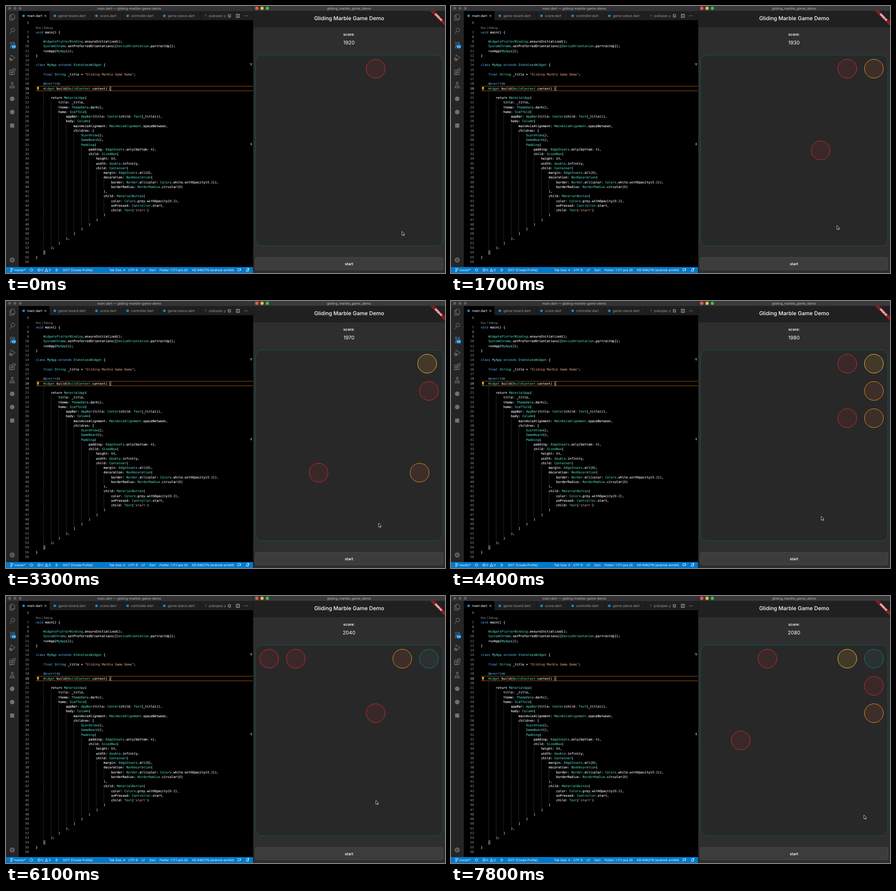
Write an HTML page that moves like this. It is 958x584 px and loops after 8 s.

```html
<!DOCTYPE html>
<html lang="en">
<head>
<meta charset="utf-8">
<title>Gliding Marble Game Demo</title>
<style>
  html, body { margin: 0; width: 100%; height: 100%; overflow: hidden; background: #000; }
  svg { display: block; width: 100vw; height: 100vh; }
  text { font-family: Inter, "Open Sans", sans-serif; fill: #fff; white-space: pre; text-rendering: geometricPrecision; }
  .mono text { font: 6.834px "DejaVu Sans Mono", monospace; color: #fff; }
  .mono text, .mono tspan { fill: currentColor; stroke: currentColor; stroke-width: .14; }
  .mid { text-anchor: middle; }
  .icon { fill: none; stroke: #858585; stroke-width: 1; }
  .kw { color: #569cd6; } .type { color: #4ec9b0; } .str { color: #ce9178; } .num { color: #b5cea8; }
</style>
</head>
<body>
<svg id="stage" viewBox="0 0 958 584" preserveAspectRatio="none">
  <rect width="958" height="584"/>
  <rect width="539" height="11" fill="#333335"/>
  <g fill="#5d5d5f"><circle cx="8" cy="5" r="3.2"/><circle cx="19.5" cy="5" r="3.2"/><circle cx="31" cy="5" r="3.2"/></g>
  <text class="mid" x="269" y="7.5" font-size="7.3" style="fill:#bbb">main.dart — gliding-marble-game-demo</text>
  <rect y="11" width="28" height="560" fill="#252526"/>
  <rect x="28" y="11" width="511" height="20" fill="#1f1f20"/>
  <rect x="28" y="11" width="67" height="20"/>
  <g id="tabs"></g>
  <path d="M83.8 19.3l4.4 4.4m0-4.4l-4.4 4.4" stroke="#ddd" stroke-width=".9"/>
  <g fill="none" stroke="#ccc" stroke-width=".9">
    <path d="M485 25v-6h3m-1.5-1.5l1.5 1.5-1.5 1.5M490 18v6h-3m1.5-1.5l-1.5 1.5 1.5 1.5"/>
    <path d="M502.5 18h7v7h-7zM506 18v7"/>
  </g>
  <g fill="#ccc"><circle cx="520.5" cy="21.5" r=".7"/><circle cx="523.5" cy="21.5" r=".7"/><circle cx="526.5" cy="21.5" r=".7"/></g>

  <g class="icon">
    <path d="M11 21V18h5l3 3v7h-8v-7M11 21H8v10h8v-3"/>
    <path d="M12 56l-4 5M15 48.5a4 4 0 1 1-.1 0"/>
    <path d="M11 82.5v6M17 83c0 3-6 2-6 5M11 78.5a2 2 0 1 1-.1 0M17 79a2 2 0 1 1-.1 0M11 88a2 2 0 1 1-.1 0"/>
    <path d="M11 111v-4l9 6-7 5M10.5 114a2.8 3 0 1 1-.1 0M7 117h7M8 113l5 7"/>
    <path d="M8 140h5v10H8zM8 145h10v5H8M15 137h5v5h-5z"/>
    <path d="M11 167h5M12 167v5l-4 7h11l-4-7v-5M10 176h7"/>
    <circle cx="13.5" cy="555.5" r="4.5" stroke-width="2" stroke-dasharray="2 1.53"/>
    <circle cx="13.5" cy="555.5" r="3.8"/><circle cx="13.5" cy="555.5" r="1.5"/>
  </g>
  <g fill="#707070">
    <circle cx="13.5" cy="203" r="5"/><circle cx="13.5" cy="232" r="5"/>
    <rect x="9" y="257" width="9" height="9"/>
  </g>
  <circle cx="17" cy="88.5" r="5.3" fill="#007acc"/>
  <text class="mid" x="17" y="90.6" font-size="5.6" font-weight="600">94</text>

  <g id="guides" stroke="#3c3c3c" stroke-width=".7"></g>
  <path d="M66 175.5H538.5M66 185.5H538.5" stroke="#a0560f"/>
  <g fill="none" stroke="#888" stroke-width=".7"><path d="M225.8 176.2h4v8.6h-4zM81.7 534.8h4v8.6h-4z"/></g>
  <circle cx="69.8" cy="179.3" r="2.3" fill="#fc0"/><path d="M68.8 182h2v2h-2z" fill="#ddd"/>
  <text x="65" y="50" font-size="6.3" style="fill:#999">Run | Debug</text>
  <g id="code" class="mono"></g>
  <path d="M531.5 126h6.5M535 126v5M533 128h4" stroke="#888"/>
  <path d="M535 299.5v5" stroke="#999" stroke-width="2"/>

  <rect y="571" width="539" height="13" fill="#007acc"/>
  <g id="status"></g>
  <g fill="none" stroke="#fff" stroke-width=".8">
    <path d="M11 575.5v4M14.5 576v1c0 1.5-3.5 1-3.5 2.5M11 573.5a1 1 0 1 1-.1 0M14.5 574a1 1 0 1 1-.1 0M11 579.5a1 1 0 1 1-.1 0"/>
    <path d="M52.5 577.5a3 3 0 0 1 5.7-1M58.8 577.5a3 3 0 0 1-5.7 1M57 576.7h2M52.2 578.3h2"/>
    <path d="M72.2 574.5a3 3 0 1 1-.1 0M71 576.4l2.4 2.4m0-2.4l-2.4 2.4"/>
    <path d="M88.3 574.5l3.3 6h-6.6zM88.3 576.5v2"/>
    <path d="M109.3 574.7l4.2 2.9-4.2 2.9z"/>
    <path d="M506 574.5h6v4h-3l-2 2v-2h-1zM509 579l4-4"/>
    <path d="M524 579.5h6l-1-1.5v-2a2 2 0 0 0-4 0v2zM526.3 580.5h1.5"/>
  </g>
  <circle cx="529" cy="575" r="1.5" fill="#fff"/>

  <rect x="539" width="419" height="584" fill="#2e2e2e"/>
  <rect x="539" width="419" height="11" fill="#3a3a3c"/>
  <circle cx="547.3" cy="5" r="3.4" fill="#fc5753"/><circle cx="558.8" cy="5" r="3.4" fill="#fdbc40"/><circle cx="570.3" cy="5" r="3.4" fill="#33c748"/>
  <text class="mid" x="748.5" y="7.6" font-size="7.3" style="fill:#bbb">gliding_marble_game_demo</text>
  <linearGradient id="shade" x2="0" y2="1"><stop stop-opacity=".45"/><stop offset="1" stop-opacity="0"/></linearGradient>
  <rect x="540" y="44" width="418" height="4" fill="url(#shade)"/>
  <rect x="540" y="10.5" width="418" height="33.5" fill="#202020"/>
  <text class="mid" x="748.8" y="31.4" font-size="11.7" font-weight="500">Gliding Marble Game Demo</text>
  <path d="M925 10.5h9.8L958 33.7v9.9z" fill="#8a1c22"/>
  <text class="mid" y="2.1" transform="translate(943.9 24.6) rotate(45)" font-size="5.9" font-weight="900">DEBUG</text>
  <text class="mid" x="748.5" y="64.8" font-size="8.2" font-weight="600">score:</text>
  <text class="mid" id="score" x="748.5" y="83.5" font-size="11"></text>
  <rect x="544.5" y="107.2" width="408.5" height="417.5" rx="14" fill="#282828" stroke="#0b5a53"/>
  <rect x="544" y="550" width="409.5" height="27" rx="3.5" fill="#3c3c3c" stroke="#505050" stroke-width=".9"/>
  <text class="mid" x="748.5" y="567" font-size="8.2" font-weight="600">start</text>
  <g id="board"></g>
  <path id="cursor" d="M0 0V8.5L2 6.8 3.3 9.7 4.8 9 3.5 6.2H6.1Z" fill="#000" stroke="#fff" stroke-width=".8"/>
  <path d="M539.5 0V584" stroke="#161616"/>
</svg>
<script>
const $ = id => document.getElementById(id);

function add(parent, tag, attrs, html = '') {
  const node = document.createElementNS('http://www.w3.org/2000/svg', tag);
  for (const key in attrs) node.setAttribute(key, attrs[key]);
  node.innerHTML = html;
  return parent.appendChild(node);
}

// Editor
function tabText(x, label, fill) {
  add($('tabs'), 'text', { x, y: 24.2, 'font-size': 7.45, style: `fill:${fill}` }, label);
}
[['main.dart', 46], ['game-board.dart', 114], ['score.dart', 205], ['controller.dart', 273],
 ['game-piece.dart', 353]].forEach(([name, x], i) => {
  add($('tabs'), 'circle', { cx: x - 7.5, cy: 21.5, r: 2.8, fill: '#1d8ac4' });
  tabText(x, name, i ? '#999' : '#fff');
});
tabText(435, '!', '#b9a8d0');
tabText(443, 'pubspec.y', '#999');
[95, 187, 255, 336, 424].forEach(x => add($('tabs'), 'path', { d: `M${x} 11v20`, stroke: '#151515' }));

[['master*', 18], ['0', 77], ['0', 93.5], ['GIST [Create Profile]', 124], ['Tab Size: 4', 225], ['UTF-8', 267],
 ['LF', 296], ['Dart', 313], ['Flutter: 1.17.1-pre.20', 335], ['KD R482TN (android-arm64)', 406]]
  .forEach(([label, x]) => add($('status'), 'text', { x, y: 580.1, 'font-size': 6.7 }, label));

const code = `void main() {

    WidgetsFlutterBinding.ensureInitialized();
    SystemChrome.setPreferredOrientations([DeviceOrientation.portraitUp]);
    runApp(MyApp());
}

class MyApp extends StatelessWidget {

    final String _title = "Gliding Marble Game Demo";

    @override
    Widget build(BuildContext context) {

        return MaterialApp(
            title: _title,
            theme: ThemeData.dark(),
            home: Scaffold(
                appBar: AppBar(title: Center(child: Text(_title))),
                body: Column(
                    mainAxisAlignment: MainAxisAlignment.spaceBetween,
                    children: [
                        ScoreView(),
                        GameBoard(),
                        Padding(
                            padding: EdgeInsets.only(bottom: 4),
                            child: SizedBox(
                                height: 64,
                                width: double.infinity,
                                child: Container(
                                    margin: EdgeInsets.all(8),
                                    decoration: BoxDecoration(
                                        border: Border.all(color: Colors.white.withOpacity(0.2)),
                                        borderRadius: BorderRadius.circular(8)
                                    ),
                                    child: MaterialButton(
                                        color: Colors.grey.withOpacity(0.2),
                                        onPressed: Controller.start,
                                        child: Text('start')
                                    )
                                )
                            )
                        )
                    ]
                ),
            )
        );
    }
}
`.split('\n');

const tokens = /("[^"]*"|'[^']*')|(\b(?:void|class|extends|final)\b|@override)|\b([A-Z]\w*|double)\b|\b(\d[\d.]*)/g;
const paint = line => line.replace(tokens, (all, str, kw, type) =>
  `<tspan class="${str ? 'str' : kw ? 'kw' : type ? 'type' : 'num'}">${all}</tspan>`);

const CHAR = 4.114, LINE = 10.25;
function lineNumber(n, y) {
  add($('code'), 'text', { x: 50, y, 'text-anchor': 'end', style: `color:${n === 19 ? '#ccc' : '#858585'}` }, n);
}
lineNumber(6, 39.1);
code.forEach((line, i) => {
  const mid = 57.2 + i * LINE, text = line.trimStart();
  const indent = text ? line.length - text.length : i === 13 ? 8 : 0;
  lineNumber(i + 7, mid + 2.4);
  if (text) add($('code'), 'text', { x: 65 + indent * CHAR, y: mid + 2.4 }, paint(text));
  for (let col = 4; col < indent; col += 4)
    add($('guides'), 'path', { d: `M${65.5 + col * CHAR} ${mid - LINE / 2}v${LINE}` });
});

// Game: equal pieces merge when a swipe pushes them together
const LOOP = 8000, SLIDE = 160, STAGGER = 35, SIZE = 7;
const looks = [['#d92b2f', '#3a2829'], ['#ed971c', '#3d2e2a'], ['#f3bf3c', '#423929'], ['#13806f', '#2b3030']];
const dirs = { R: [1, 0], L: [-1, 0], U: [0, -1] };
const pieces = [], scores = [[0, 1920]];

function spawn(t, c, r) {
  pieces.push({ c, r, start: [c, r], born: t, dies: Infinity, rank: t, level: 0, levels: [[t, 0]], legs: [] });
}

function swipe(t, dir) {
  const [dx, dy] = dirs[dir], inside = n => n >= 0 && n < SIZE;
  const live = pieces.filter(p => !p.gone).sort((a, b) => (b.c - a.c) * dx + (b.r - a.r) * dy);
  const moved = [];
  for (const p of live) {
    const from = [p.c, p.r];
    let hit;
    while (inside(p.c + dx) && inside(p.r + dy)) {
      hit = live.find(q => !q.gone && q !== p && q.c === p.c + dx && q.r === p.r + dy);
      if (hit) break;
      p.c += dx;
      p.r += dy;
    }
    if (hit && hit.level === p.level && hit.merged !== t) {
      hit.levels.push([t, ++hit.level]);
      hit.merged = hit.rank = t;
      p.gone = true;
      p.c = hit.c;
      p.r = hit.r;
      scores.push([t, scores[scores.length - 1][1] + 10 * hit.level]);
    }
    if (p.c !== from[0] || p.r !== from[1]) moved.push({ p, from });
  }
  moved.sort((a, b) => !!a.p.gone - !!b.p.gone || a.p.rank - b.p.rank);
  moved.forEach(({ p, from }, i) => {
    const at = t + STAGGER * (i + (p.gone ? 1 : 0));
    p.legs.push({ at, from, to: [p.c, p.r] });
    if (p.gone) p.dies = at + SLIDE;
  });
}

// time, then a swipe direction or the cell of a new piece
`0 40,200 R,500 64,900 U,1200 20,1350 R,1650 43,1800 R,2000 52,2250 U,2550 34,2700 L,2950 24,3128 R,
3450 63,3750 U,3950 20,4100 R,4350 52,4800 U,5050 03,5300 U,5500 14,5750 U,6050 42,6250 R,6480 31,
6650 R,6920 12,7150 R,7380 24,7500 U,7740 13`.split(',').forEach(step => {
  const [time, what] = step.trim().split(' ');
  if (dirs[what]) swipe(+time, what);
  else spawn(+time, +what[0], +what[1]);
});
pieces.forEach(p => p.node = add($('board'), 'circle', { r: 20.6 }));

const path = [[0, 864, 493], [200, 870, 492], [500, 902, 466], [600, 902, 466], [700, 902, 466], [900, 898, 440],
  [1200, 826, 462], [1500, 846, 462], [1700, 842, 480], [2000, 886, 478], [2100, 886, 478], [2300, 882, 446],
  [2600, 850, 470], [2800, 802, 480], [3100, 800, 485], [3300, 813, 486], [3500, 850, 485], [3600, 850, 485],
  [3800, 838, 448], [4000, 790, 470], [4400, 808, 471], [4800, 808, 440], [5050, 806, 468], [5300, 806, 436],
  [5550, 805, 466], [5800, 806, 436], [6100, 807, 447], [6300, 846, 460], [6500, 812, 484], [7000, 866, 502],
  [7200, 904, 500], [7350, 896, 508], [7800, 901, 479]];

const mix = (a, b, k) => a + (b - a) * k;
const latest = (list, t) => list.filter(e => e[0] <= t).pop()[1];

// cubic-bezier(.25, .1, .25, 1)
function ease(x) {
  if (x >= 1) return 1;
  const curve = (a, b, u) => 3 * a * u * (1 - u) ** 2 + 3 * b * u * u * (1 - u) + u ** 3;
  let lo = 0, hi = 1;
  for (let i = 0; i < 20; i++) {
    const u = (lo + hi) / 2;
    if (curve(.25, .25, u) < x) lo = u; else hi = u;
  }
  return curve(.1, 1, lo);
}

function drawPiece(p, t) {
  const shown = t >= p.born && t < p.dies;
  p.node.setAttribute('visibility', shown ? 'visible' : 'hidden');
  if (!shown) return;
  let [c, r] = p.start;
  for (const { at, from, to } of p.legs) {
    if (t < at) break;
    const k = ease((t - at) / SLIDE);
    c = mix(from[0], to[0], k);
    r = mix(from[1], to[1], k);
  }
  const [stroke, fill] = looks[latest(p.levels, t)];
  const attrs = { cx: 574.3 + c * 58.1, cy: 137.1 + r * 59.6, stroke, fill };
  for (const key in attrs) p.node.setAttribute(key, attrs[key]);
}

function drawCursor(t) {
  const i = path.findIndex(p => p[0] > t);
  const b = i < 0 ? path[path.length - 1] : path[i], a = i < 0 ? b : path[i - 1];
  const k = a === b ? 0 : (t - a[0]) / (b[0] - a[0]);
  $('cursor').setAttribute('transform', `translate(${mix(a[1], b[1], k)} ${mix(a[2], b[2], k)})`);
}

function frame() {
  const t = performance.now() % LOOP;
  pieces.forEach(p => drawPiece(p, t));
  $('score').textContent = latest(scores, t);
  drawCursor(t);
  requestAnimationFrame(frame);
}
frame();
</script>
</body>
</html>
```
